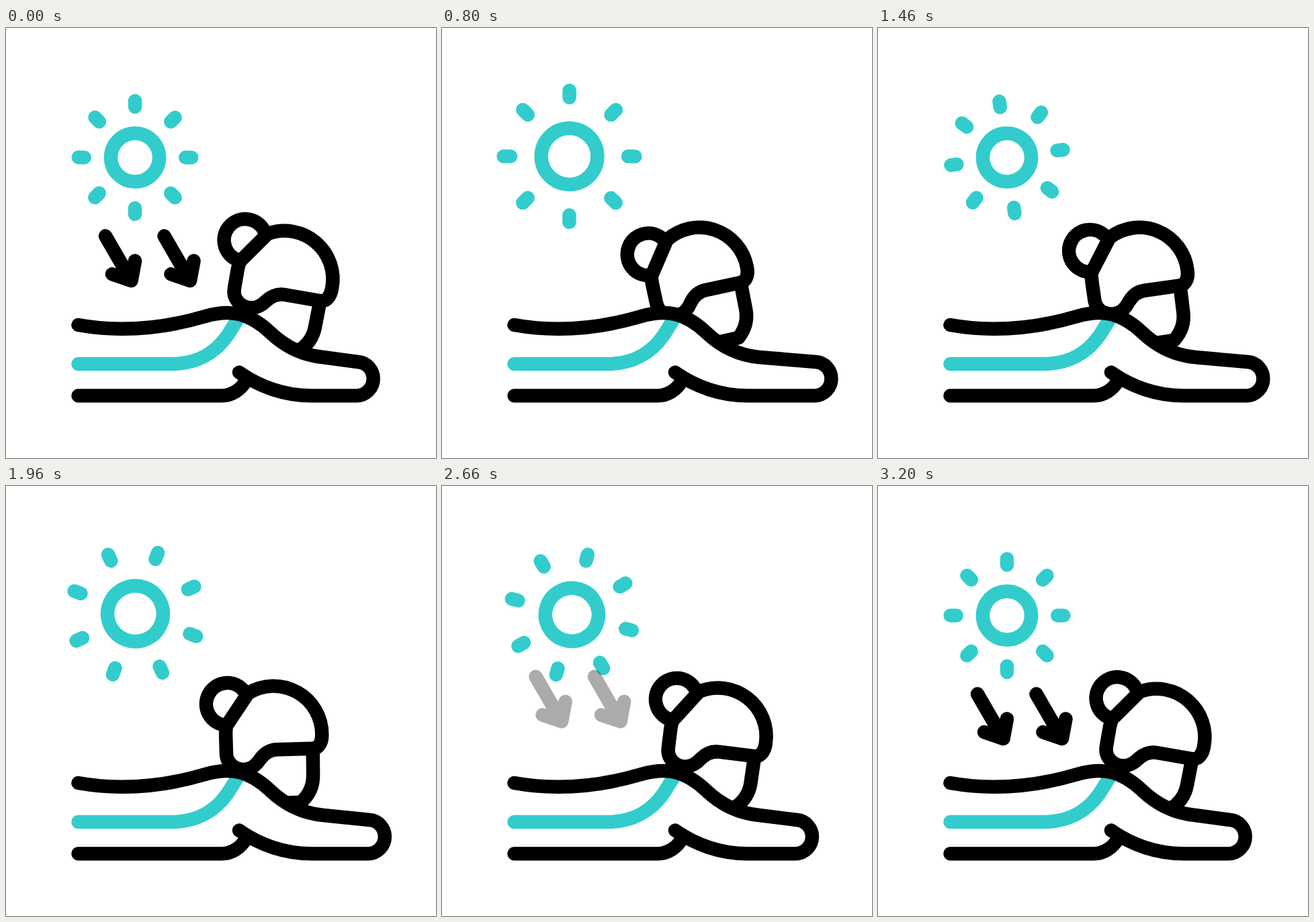
Write an HTML page that moves like this. It is 640 px wide and 640 px high and loops after 3220 ms.

```html
<!DOCTYPE html>
<html lang="en">
<head>
<meta charset="utf-8">
<title>Sunbathing</title>
<style>
  html, body { margin: 0; width: 100%; height: 100%; overflow: hidden; background: #fff; }
  svg { display: block; width: 100%; height: 100%; }
  .line { fill: none; stroke: #000; stroke-width: 20.5; stroke-linecap: round; stroke-linejoin: round; }
  .teal { stroke: #3cc; }
</style>
</head>
<body>
<svg viewBox="0 0 640 640">
  <g id="sun" class="line teal">
    <circle id="disc"/>
    <path id="rays"/>
  </g>
  <g id="head" class="line">
    <path d="M467 409L460 445C457 461 448 473 434 481L410 477"/>
    <path d="M348 346.300A31.5 31.5 0 1 1 384 301.300"/>
    <path d="M348.500 347L389.500 306.300A72 72 0 0 1 485 388.300C483.500 397 478 408 467 406L415 397
             C404 395 396 398.500 388 405.500C380 413.500 373 416.500 366 416.500C349 416.500 337 403 340 387L344.500 361C346 353 347 350 348.500 347Z"/>
  </g>
  <path id="skin" fill="#fff"/>
  <path class="line teal" d="M107.500 500H247C282 500 311 485 330 457L347 430"/>
  <path class="line" d="M107.500 547.300H321C336 547.300 350 538 357 525"/>
  <path id="body" class="line"/>
  <g id="arrows">
    <path id="arrow" class="line" d="M148 309.500L186.500 376M158 366.300L186.500 376L192 346.500"/>
    <use href="#arrow" x="87.500"/>
  </g>
</svg>
<script>
const LOOP = 3220, END = 3200;
const $ = id => document.getElementById(id);
const set = (id, attrs) => {
  for (const name in attrs) $(id).setAttribute(name, attrs[name]);
};
const clamp = x => Math.min(1, Math.max(0, x));
const progress = (t, from, to) => clamp((t - from) / (to - from));
const ease = x => x * x * (3 - 2 * x);
const pulse = (t, from, peak, to) =>
  ease(progress(t, from, peak)) * (1 - ease(progress(t, peak, to)));

function drawSun(t) {
  const grow = 0.2 * (pulse(t, 0, 540, 1480) + pulse(t, 1480, 2200, 3110));
  const scale = 1 + grow;
  let rays = '';
  for (let i = 0; i < 8; i++) {
    const x = Math.cos(i * Math.PI / 4) * scale;
    const y = Math.sin(i * Math.PI / 4) * scale;
    rays += `M${75.25 * x} ${75.25 * y}L${84.25 * x} ${84.25 * y}`;
  }
  set('disc', { r: 36 * scale });
  set('rays', { d: rays });
  // The sun grows from a point slightly off its centre.
  set('sun', {
    transform: `translate(192 192.700) rotate(${180 * t / END}) translate(${-18 * grow} ${3.5 * grow})`
  });
}

function drawArrows(t) {
  const leave = progress(t, 0, 800);
  const enter = progress(t, 2400, END);
  const shift = t < 1600 ? leave : enter - 1;
  set('arrows', {
    transform: `translate(${12.5 * shift} ${38 * shift})`,
    opacity: 1 - Math.abs(shift)
  });
}

function drawWoman(t) {
  const stretch = pulse(t, 0, 800, END);
  const reach = 32.7 * stretch;
  const d = `M107.500 442C172 453.500 237 446.500 295 429.500C335 418 362 424 393 453C415 474 440 487 472 490
    L${524 + reach} 497C${537 + reach} 498 ${546.7 + reach} 509 ${546.7 + reach} 522
    A25.300 25.300 0 0 1 ${522 + reach} 547.300H455C415 547.300 377 534 347 512.500`;
  set('skin', { d });
  set('body', { d });
  set('head', { transform: `rotate(${-22 * stretch} 386 452)` });
}

const start = performance.now();
function frame() {
  const t = Math.min((performance.now() - start) % LOOP, END);
  drawSun(t);
  drawArrows(t);
  drawWoman(t);
  requestAnimationFrame(frame);
}
frame();
</script>
</body>
</html>
```
